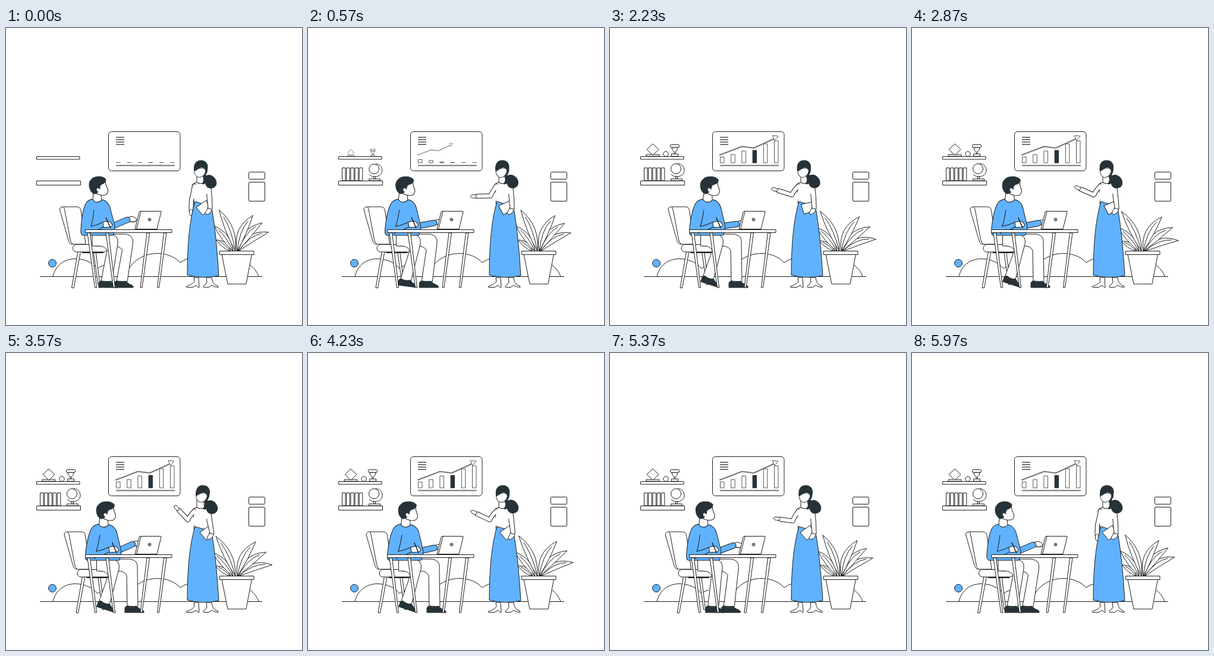
Recreate the animation shown at these times as an HTML page with a canvas. Size 498 px wide and 500 px high, loop 6.01 s.

```html
<!DOCTYPE html>
<html lang="en">
<head>
<meta charset="utf-8">
<title>Office presentation</title>
<style>
html, body { margin: 0; width: 100%; height: 100%; overflow: hidden; background: #fff; }
canvas { display: block; }
</style>
</head>
<body>
<canvas id="stage" width="498" height="500"></canvas>
<script>
const ctx = document.getElementById('stage').getContext('2d');
const LOOP = 6010, TAU = Math.PI * 2;
const INK = '#1e1e1e', DARK = '#263238', BLUE = '#60b2ff', WHITE = '#fff', GREY = '#777';

const mix = (a, b, k) => a + (b - a) * k;
function ramp(t, from, to) {
  const p = Math.max(0, Math.min(1, (t - from) / (to - from)));
  return p * p * (3 - 2 * p);
}
// Eases up to 1, holds, and eases back to 0
const pulse = (t, a, b, c, d) => ramp(t, a, b) * (1 - ramp(t, c, d));

function shape(d, fill = WHITE, stroke = INK, width = 1) {
  const p = typeof d === 'string' ? new Path2D(d) : d;
  ctx.lineJoin = 'round';
  ctx.lineWidth = width;
  if (fill) { ctx.fillStyle = fill; ctx.fill(p); }
  if (stroke) { ctx.strokeStyle = stroke; ctx.stroke(p); }
}
const line = (d, color = INK, width = 1) => shape(d, null, color, width);

function box(x, y, w, h, r = 0, fill = WHITE, stroke = INK) {
  const p = new Path2D();
  p.roundRect(x, y, w, h, r);
  shape(p, fill, stroke);
}

function oval(x, y, rx, ry = rx, turn = 0, fill = WHITE, stroke = INK) {
  const p = new Path2D();
  p.ellipse(x, y, rx, ry, turn, 0, TAU);
  shape(p, fill, stroke);
}

function limb(d, w, fill) {
  ctx.lineCap = 'round';
  line(d, INK, w);
  line(d, fill, w - 2);
  ctx.lineCap = 'butt';
}

function at(x, y, turn, scale, draw) {
  ctx.save();
  ctx.translate(x, y);
  ctx.rotate(turn);
  ctx.scale(scale, scale);
  draw();
  ctx.restore();
}

function room() {
  line('M79 418C84 398 99 389 116 388.500C132 388.500 146 395 154 405Q158 401 166 399');
  line('M203 412C213 391 232 379.500 256 379.500C272 380 285 386 293 395Q304 387 320 386');
  line('M395 392C410 396 420 405 425 418');
  line('M57 418.500H431');
  oval(78, 396, 6.5, 6.5, 0, BLUE);
  box(408.5, 242.5, 27, 12, 1);
  box(408.5, 259.5, 27, 32, 1.5);
}

function shelves(t) {
  box(51.5, 216.5, 72.5, 4.5);
  box(51.5, 257.5, 74, 7);
  const grow = (x, y, start, time, draw) => {
    const s = ramp(t, start, start + time);
    if (s > 0.01) at(x, y, 0, s, draw);
  };
  grow(74, 257, 0, 480, () => {
    for (let i = 0; i < 5; i++) box(-16.5 + i * 7.2, -21.5, 5.5, 21.5);
  });
  grow(112, 257, 0, 620, () => {
    line('M2 -29C16 -27 17 -9 3 -7Q-6 -6 -9 -11');
    oval(-1, -20, 8.5);
    box(-1.5, -7, 3, 4);
    box(-9.5, -3, 19, 3);
  });
  grow(72, 216, 200, 700, () => {
    box(-11, -3, 22, 3);
    shape('M0 -21L10 -11.500L0 -2L-10 -11.500Z');
  });
  grow(94, 216, 450, 600, () => oval(0, -4, 4.2));
  grow(109, 216, 170, 700, () => {
    shape('M-5 -15Q-4 -8 -1 -8V-4H1V-8Q4 -8 5 -15Z');
    box(-7.5, -19.5, 15, 4.5, 1);
    box(-5.5, -4, 11, 4);
  });
}

function board(t) {
  box(172.5, 174.5, 120.5, 66, 5);
  for (let i = 0; i < 4; i++) line(`M185 ${184 + i * 4}H199`, GREY, 2);
  line('M185 231.500H284', GREY, 2);
  [10, 14, 20, 21, 32, 37].forEach((full, i) => {
    const x = 185.5 + i * 18.2, h = full * ramp(t, i * 200, i * 200 + 1050);
    const tone = i === 3 ? DARK : '#555';
    if (h < 1) line(`M${x} 226.500h7`, tone);
    else box(x, 227 - h, 6.5, h, 0, i === 3 ? DARK : WHITE, tone);
  });
  const s = ramp(t, 0, 1000) + 0.02 * pulse(t, 900, 1300, 1400, 1900);
  if (s > 0.01) at(184, 214, 0, s, () => {
    line('M0 0L38 -14.500L58 -12L93 -28', GREY, 2);
    shape('M89 -33L99 -32L93 -24.500Z', WHITE, '#555');
  });
}

function leaf(x, y, angle, len, inner, outer) {
  const a = angle * Math.PI / 180, c = Math.cos(a), s = -Math.sin(a);
  const pt = (u, v) => `${x + c * u - s * v} ${y + s * u + c * v}`;
  const mid = (inner + outer) / 2;
  shape(`M${x} ${y}Q${pt(len / 2, inner)} ${pt(len, 0)}Q${pt(len / 2, outer)} ${x} ${y}Z`);
  line(`M${x} ${y}Q${pt(len / 2, mid)} ${pt(len * 0.82, mid * 0.35)}`);
}

function plant(t) {
  const sway = (1 - Math.cos(t / LOOP * TAU)) / 2;
  for (let i = 2; i >= 0; i--) {
    leaf(386 - i * 4, 376, 111.5 + 15 * i + 5 * sway, 75 - 22 * i, 20 - 4 * i, -5);
    leaf(389 + i, 376, 66.5 - 17 * i - (5 + 5 * i) * sway, 66 - 3 * i, -24, 3 - i * 2);
  }
  shape('M363 381L373 431H404L413.500 381Z');
  box(359.5, 375.5, 57.5, 6);
}

function chair() {
  shape('M147 376L155 432H158L151 376Z');
  shape('M121 376L110.500 437.500H114L125.500 376Z');
  shape('M97 301H119Q125 301 126 307L134 364H110Q106 362 105 357L90.500 306Q90 301 97 301Z');
  line('M97 301.500Q98 303 99 308L108 356Q109 361 112 364');
  box(112.5, 364.5, 58, 12.5, 6);
  line('M128 378H164', INK, 2);
}

function leg(hip, knee, foot, turn) {
  const lift = 12 * Math.sin(turn);
  shape(`M${hip} 347H${knee - 12}Q${knee + 2} 349 ${knee} 363L${foot + 22} 427L${foot + 4} ${426 - lift}L${knee - 18} 374Q${knee - 22} 367 ${knee - 32} 367H${hip}Z`);
  at(foot + 32, 437, turn, 1, () =>
    shape('M-32 0V-8Q-30 -12 -27 -11Q-20 -8 -13 -11Q-8 -6 -2 -4Q1 -2 0 0Z', DARK, DARK));
}

function man(t, slide, pose) {
  const lean = pulse(t, 0, 700, 4500, 5970);
  const near = 156 - 5 * pulse(t, 0, 600, 4200, 4700) + 7 * pulse(t, 4300, 4800, 5000, 5970);
  leg(150 + slide, 213.5 + slide, 182 + 18 * pulse(t, 0, 1600, 4300, 5970), 0);
  leg(145 + slide, 188 + slide * 0.3, near, 0.32 * pulse(t, 0, 1300, 4200, 4800));

  const hx = 219 + 9 * lean, hy = 322 + pose.raise * (8 - 9 * pose.wave);
  oval(hx - 7, hy, 7.5, 4.5, 0.15);
  line(`M${hx - 10} ${hy + 4}Q${hx - 4} ${hy + 5} ${hx} ${hy + 3}`);
  limb(`M${178 + slide} 334L${hx - 15} ${hy + 1}`, 10.5, BLUE);

  ctx.save();
  ctx.transform(1 + 0.05 * lean, 0, -0.035 * lean, 1, slide + 5.8 * lean, 0);
  shape('M147 275L146 290Q153 297 161 290L160 280Z');
  shape('M145 288Q153 298 162 289Q171 291 175 302L183 333Q183 344 180 349H129Q125 347 126 338Q128 308 134 296Q137 290 145 288Z', BLUE);
  line('M148 306Q146 324 143 334Q153 332 163 327');
  line('M140 346Q155 340 164 335');
  shape('M163 327Q170 324 175 326L179 331Q179 334 174 335L165 336Q163 332 163 327Z');
  line('M168 319L176 337', INK, 1.5);

  at(153, 282, 0.06 * lean, 1, () => {
    shape('M-5 -14L-1 -25Q7 -28 14 -24L15 -18L18.500 -10Q19 -3 15 -1.500Q11 0 6 -1Q0 -2 -5 -6Z');
    shape('M-5 -3C-14 -8 -15 -22 -10 -26C-7 -32 8 -35 15 -27Q15 -21 8 -19Q4 -17 5 -11Q1 -15 -1 -11Q-1 -7 2 -6Q-2 -2 -5 -3Z', DARK, DARK);
  });
  ctx.restore();
}

function table() {
  for (const side of [0, 1]) for (const end of [0, 1]) {
    const top = 137 + side * 31 + end * (100 - side * 2.5);
    const foot = top + (end ? -11 : 12.5);
    shape(`M${top} 345h4.500L${foot + 3} 437H${foot}Z`);
  }
  box(133.5, 339.5, 145.5, 5);
  shape('M226 308.500H260Q261.500 308.500 261 310L254 338.500H217L224 310Q224.500 308.500 226 308.500Z');
  line('M227 309L219.500 338.500');
  oval(241.5, 322.5, 3, 3, 0, GREY, null);
}

function pointingArm({ raise, wave }) {
  const ex = mix(312, 306, raise), ey = mix(289, 281, raise);
  const a = mix(92, 194 + 33 * wave, raise) * Math.PI / 180;
  const len = mix(25, 36 - 4 * wave, raise);
  const pt = k => [ex + Math.cos(a) * len * k, ey + Math.sin(a) * len * k];
  limb(`M317 266Q${ex + 2} ${ey - 6} ${ex} ${ey}L${pt(0.68)}`, 8, WHITE);
  oval(...pt(0.86), 5.5, 2.8, a);
}

function woman(t, pose) {
  const cardTurn = 0.4 * pulse(t, 0, 1200, 2400, 3400);
  const reach = 6 * pulse(t, 2400, 3500, 3700, 4700);
  const nod = pose.raise * (pose.wave - 0.4);

  shape('M316 420L317 427Q312 433 304 434.500Q302 436 304 436.500H314L320 433L323 436.500H325L324 420Z');
  shape('M337 420L338 428Q335 433 332 434.500Q331 436 333 436.500H341L346 433Q350 436.500 357 436.500Q358 434 353 433Q347 430 346 420Z');

  shape('M321 247V260Q327 264 334 261L332 246Z');
  shape('M321 260Q327 264 334 260Q342 261 344 268L342 302L316 296L317 282L313 266Q314 261 321 260Z');
  pointingArm(pose);
  shape('M318 263Q326 264 326 274L322 294H317L315 280Z', WHITE, null);
  shape('M318 292Q330 297 341 297L347 308Q354 350 358 417Q331 423 305 416Q305 335 318 292Z', BLUE);

  // Folder and the arm that holds it
  at(333 + reach, 303, cardTurn, 1, () => shape('M-13 -1L4 -13L10 2L-2 12Z'));
  const c = reach / 2;
  shape(`M337 262Q344 262 345 270Q347 285 ${347 + c} 303Q${346 + c} 311 ${339 + c} 314Q${334 + c} 314 ${336 + c} 309L${340 + c} 303L338 283Z`);
  shape('M334 263L341 263L340 279L336 279Z', WHITE, null);
  line(`M${338 + c} 303L${346 + c} 305`);

  at(328 + 3.5 * nod, 254, 0.1 * nod, 1, () => {
    shape('M5 -9Q9 -4 11 -6C19 -8 26 0 26 7C26 14 18 18 11 14Q8 11 7 7Q4 10 2 8Q7 2 3 -5Z', DARK, DARK);
    shape('M-11 -18Q-12 -8 -7 -4Q-3 -1 2 -4Q8 -8 9 -18Z', WHITE, '#444');
    shape('M-11 -13C-13 -25 -8 -31 0 -31C8 -31 12 -25 11 -18Q11 -10 7 -6Q6 -8 8 -13Q7 -18 1 -20Q-5 -17 -11 -13Z', DARK, DARK);
  });
}

function frame(t) {
  const slide = 7.5 * pulse(t, 0, 1200, 4470, 5970);
  const pose = {
    raise: pulse(t, 0, 800, 5100, 5970),
    wave: (1 + Math.cos((t - 1370) / 2200 * TAU)) / 2
  };
  ctx.fillStyle = WHITE;
  ctx.fillRect(0, 0, 498, 500);
  room();
  shelves(t);
  board(t);
  plant(t);
  at(slide, 0, 0, 1, chair);
  man(t, slide, pose);
  table();
  woman(t, pose);
}

const start = performance.now();
function tick() {
  frame((performance.now() - start) % LOOP);
  requestAnimationFrame(tick);
}
tick();
</script>
</body>
</html>
```
